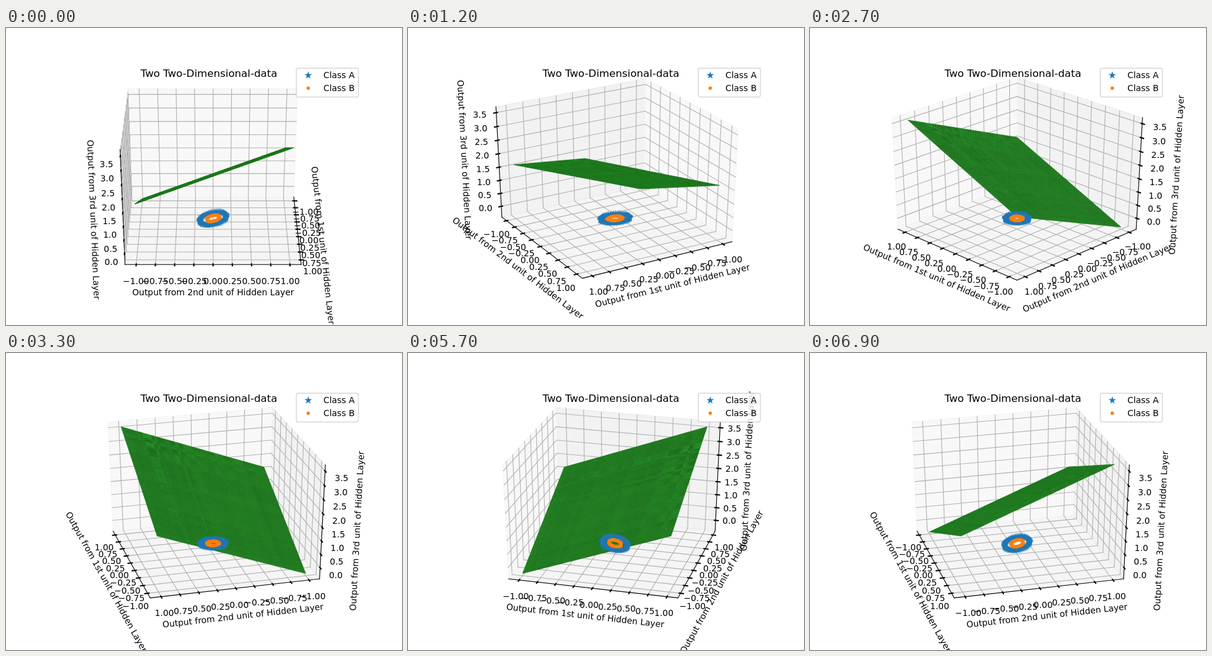
Write an HTML page with a canvas that moves like this. It is 640 by 480 pixels and loops after 7200 ms.

```html
<!DOCTYPE html>
<html lang="en">
<head>
<meta charset="utf-8">
<title>Rotating 3D plot</title>
<style>
  html, body { margin: 0; width: 100%; height: 100%; overflow: hidden; background: #fff; }
  canvas { display: block; }
</style>
</head>
<body>
<canvas id="stage" width="640" height="480"></canvas>
<script>
const ctx = document.getElementById('stage').getContext('2d');
const STEP_MS = 300, STEPS = 24, PT = 100 / 72;
const FONT = '"DejaVu Sans", Verdana, sans-serif';
const BLUE = '#1f77b4', ORANGE = '#ff7f0e';
const ASCENT = 10.6, MIDDLE = 3.85;          // 10pt text metrics in px

// Axes live in a cube centred on 0 with half side 0.5; the panes reach a bit further.
const DELTA = 1 / 12, EDGE = 0.5 + DELTA / 4;
const LABEL_SHIFT = 0.1605, TICK_SHIFT = 0.0738;
const LIMITS = [[-1.1, 1.1], [-1.1, 1.1], [-0.34, 3.63]];
const toCube = (value, axis) => {
  const [lo, hi] = LIMITS[axis];
  return (value - lo) / (hi - lo) - 0.5;
};
const range = (n, f) => Array.from({ length: n }, (_, i) => f(i));
const planTicks = range(9, i => -1 + i / 4);
const AXES = [
  { name: '1st', ticks: planTicks, digits: 2, tickDir: 1, flip: 1, pane: 0.95 },
  { name: '2nd', ticks: planTicks, digits: 2, tickDir: 0, flip: 0, pane: 0.90 },
  { name: '3rd', ticks: range(8, i => i / 2), digits: 1, tickDir: 0, flip: 0, pane: 0.925 }
];

let seed = 7;
function random() {
  seed = (seed + 0x6D2B79F5) | 0;
  let t = Math.imul(seed ^ seed >>> 15, 1 | seed);
  t = t + Math.imul(t ^ t >>> 7, 61 | t) ^ t;
  return ((t ^ t >>> 14) >>> 0) / 4294967296;
}
const spread = () => random() * 2 - 1;

// Surface: a tilted plane whose cells carry streaky shading, rougher towards the top.
const CELLS = 50;
function streaks() {
  let v = spread();
  return range(CELLS, () => v = random() < 0.6 ? spread() : v);
}
const rowTone = streaks(), colTone = streaks(), rowPatch = streaks(), colPatch = streaks();
const cellColors = range(CELLS, i => range(CELLS, j => {
  const lift = ((i + j) / (2 * CELLS)) ** 2;
  const k = 0.86 + 0.018 * (rowTone[i] + colTone[j]) + 0.02 * spread() * lift
    - 0.2 * lift * rowPatch[i] * colPatch[j];
  const s = Math.max(0.6, Math.min(1, k));
  return `rgb(${34 * s | 0},${139 * s | 0},${34 * s | 0})`;
}));

// A tilted ellipse of data points.
function ring(count, scale, noise) {
  return range(count, i => {
    const t = i / count * 2 * Math.PI, r = scale * (1 + noise * spread());
    const p = 0.141 * r * Math.cos(t), q = 0.113 * r * Math.sin(t);
    return [p + q, q - p, -0.4 * p].map(toCube);
  });
}
const classA = ring(50, 1, 0.02), classB = ring(50, 0.49, 0.09);

let project;
function setCamera(azimuth) {
  const c = Math.cos(azimuth), s = Math.sin(azimuth);
  const ce = Math.cos(Math.PI / 6), se = 0.5;
  project = ([x, y, z]) => {
    const near = c * x + s * y;
    const w = 10 - ce * near - se * z;
    return [334.7 + (c * y - s * x) / w * 496 / 0.185,
            237.4 - (ce * z - se * near) / w * 369.6 / 0.185];
  };
}

function trace(points) {
  ctx.beginPath();
  points.forEach(p => ctx.lineTo(...p));
}
function line(points, color, width, cap = 'butt') {
  ctx.strokeStyle = color;
  ctx.lineWidth = width;
  ctx.lineCap = cap;
  trace(points.map(project));
  ctx.stroke();
}
function text(str, x, y, size = 10, align = 'center') {
  ctx.font = `${size * PT}px ${FONT}`;
  ctx.textAlign = align;
  ctx.fillStyle = '#000';
  ctx.fillText(str, x, y);
}
const replaced = (p, i, v) => p.map((old, k) => k === i ? v : old);
const flipped = (p, i) => replaced(p, i, -p[i]);
const pushOut = (p, axis, d) => p.map((v, k) => k === axis ? v : v + (v < 0 ? -d : d));

function drawPane(far, axis) {
  const [a, b] = [0, 1, 2].filter(k => k !== axis);
  const q = flipped(far, a);
  trace([far, q, flipped(q, b), flipped(far, b)].map(project));
  const g = Math.round(AXES[axis].pane * 255);
  ctx.fillStyle = ctx.strokeStyle = `rgba(${g},${g},${g},0.5)`;
  ctx.lineWidth = PT;
  ctx.fill();
  ctx.stroke();
}

function drawAxis(far, axis) {
  const { name, ticks, digits, tickDir, flip } = AXES[axis];
  const start = flipped(far, flip), end = flipped(start, axis);
  line([start, end], '#000', 0.8 * PT, 'square');

  const [x1, y1] = project(start), [x2, y2] = project(end);
  let angle = Math.atan2(y1 - y2, x2 - x1);
  if (angle > Math.PI / 2) angle -= Math.PI;
  if (angle < -Math.PI / 2) angle += Math.PI;
  ctx.save();
  ctx.translate(...project(pushOut(replaced(start, axis, 0), axis, LABEL_SHIFT)));
  ctx.rotate(-angle);
  text(`Output from ${name} unit of Hidden Layer`, 0, MIDDLE);
  ctx.restore();

  const places = ticks.map(v => toCube(v, axis));
  places.forEach(v => {
    const p = replaced(far, axis, v);
    line([flipped(p, (axis + 1) % 3), p, flipped(p, (axis + 2) % 3)], '#b0b0b0', 0.8 * PT);
  });
  places.forEach((v, i) => {
    const p = replaced(start, axis, v);
    const out = Math.sign(p[tickDir]) * DELTA;
    line([replaced(p, tickDir, p[tickDir] - 0.1 * out),
          replaced(p, tickDir, p[tickDir] + 0.2 * out)], '#000', 1.5 * PT, 'square');
    const [x, y] = project(pushOut(p, axis, TICK_SHIFT));
    text(ticks[i].toFixed(digits).replace('-', '\u2212'), x, y + ASCENT);
  });
}

function drawSurface() {
  const nodes = range(CELLS + 1, i => range(CELLS + 1, j => {
    const a = i / CELLS, b = j / CELLS;
    return project([toCube(2 * a - 1, 0), toCube(2 * b - 1, 1), (a + b - 1) / 2]);
  }));
  ctx.lineWidth = 0.5;
  for (let i = 0; i < CELLS; i++) {
    for (let j = 0; j < CELLS; j++) {
      trace([nodes[i][j], nodes[i + 1][j], nodes[i + 1][j + 1], nodes[i][j + 1]]);
      ctx.closePath();
      ctx.fillStyle = ctx.strokeStyle = cellColors[i][j];
      ctx.fill();
      ctx.stroke();
    }
  }
}

function star([x, y]) {
  trace(range(10, i => {
    const r = 3 * PT * (i % 2 ? 0.382 : 1), t = i * Math.PI / 5;
    return [x + r * Math.sin(t), y - r * Math.cos(t)];
  }));
  ctx.closePath();
  ctx.fillStyle = ctx.strokeStyle = BLUE;
  ctx.lineWidth = PT;
  ctx.fill();
  ctx.stroke();
}
function dot([x, y]) {
  ctx.beginPath();
  ctx.arc(x, y, 2 * PT, 0, 2 * Math.PI);
  ctx.fillStyle = ORANGE;
  ctx.fill();
}

function drawLegend() {
  ctx.beginPath();
  ctx.roundRect(469.2, 65, 100.3, 46.5, 2.8);
  ctx.fillStyle = 'rgba(255,255,255,0.8)';
  ctx.strokeStyle = 'rgba(204,204,204,0.8)';
  ctx.lineWidth = PT;
  ctx.fill();
  ctx.stroke();
  star([488.5, 76.5]);
  dot([488.5, 97.3]);
  text('Class A', 513, 81, 10, 'left');
  text('Class B', 513, 102, 10, 'left');
}

function draw(step) {
  const azimuth = step / STEPS * 2 * Math.PI;
  setCamera(azimuth);
  ctx.fillStyle = '#fff';
  ctx.fillRect(0, 0, 640, 480);
  const side = v => v < -1e-9 ? EDGE : -EDGE;
  const far = [side(Math.cos(azimuth)), side(Math.sin(azimuth)), -EDGE];
  AXES.forEach((_, axis) => drawPane(far, axis));
  AXES.forEach((_, axis) => drawAxis(far, axis));
  drawSurface();
  classA.map(project).forEach(star);
  classB.map(project).forEach(dot);
  text('Two Two-Dimensional-data', 328, 79, 12);
  drawLegend();
}

let shown = -1;
function tick() {
  const step = Math.floor(performance.now() / STEP_MS) % STEPS;
  if (step !== shown) draw(shown = step);
  requestAnimationFrame(tick);
}
tick();
</script>
</body>
</html>
```
